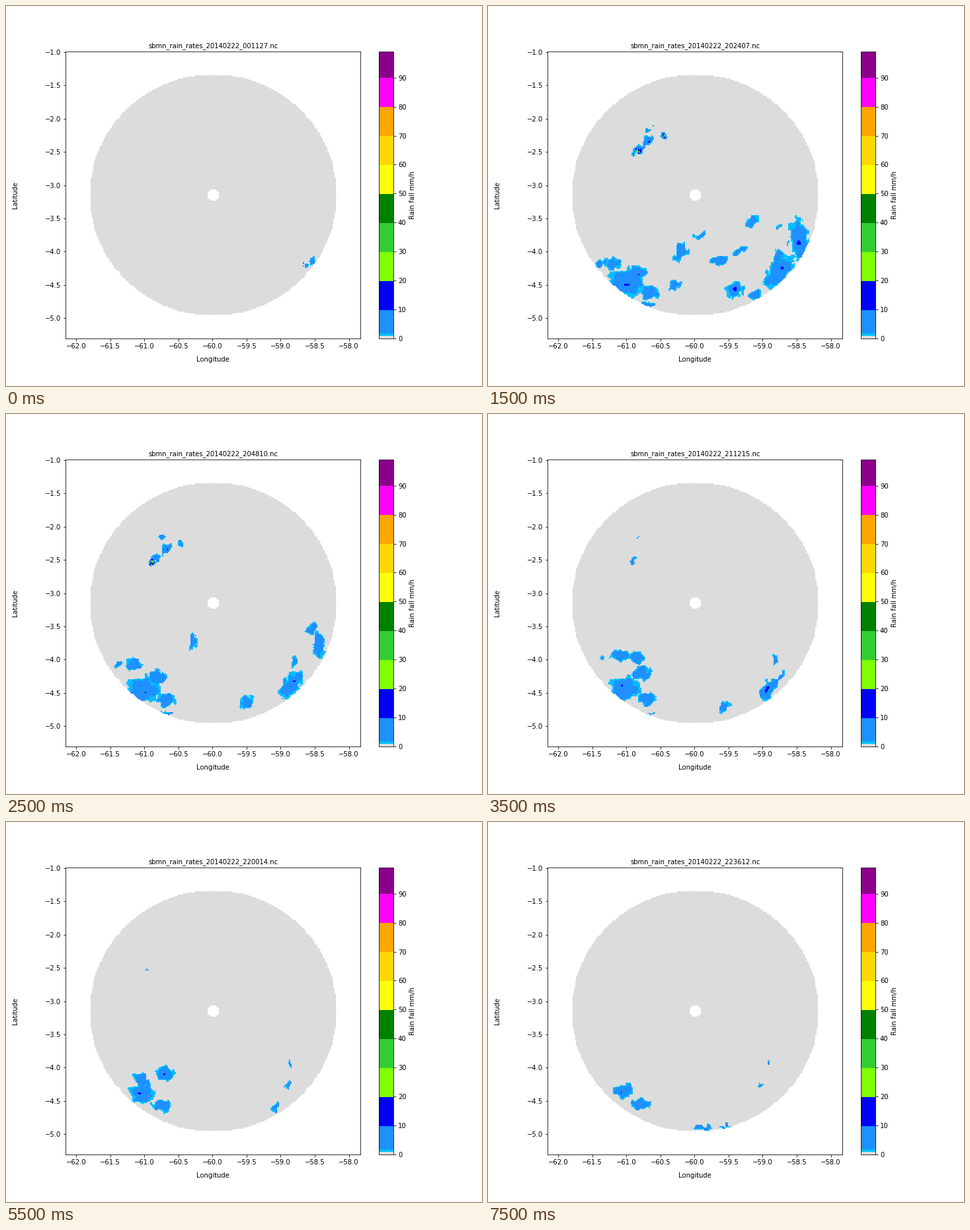
A matplotlib script for the animation above (8 s loop, 720 by 576 pixels).

```python
import numpy as np
import matplotlib.pyplot as plt
from matplotlib.animation import FuncAnimation
from matplotlib.colors import BoundaryNorm, ListedColormap
from matplotlib.transforms import Affine2D

W, H, DPI = 720, 576, 72
CX, CY = 313.2, 286.9       # radar position on the stage
DX, DY = 1.861, 1.824       # size of one radar cell
N = 100                     # range of the radar in cells
LON, LAT = -59.992, -3.149
LON_PX, LAT_PX = 103.1, 100.75   # pixels per degree

LEVELS = [0, 1, 2, *range(10, 100, 10), 99]
COLORS = ["gainsboro", "deepskyblue", "dodgerblue", "blue", "chartreuse",
          "limegreen", "green", "yellow", "gold", "orange", "magenta",
          "darkmagenta"]
TIMES = ("001127 200008 201209 202407 203608 204810 210014 211215 "
         "212413 213610 214812 220014 221213 221813 222411 223612").split()

j, i = np.mgrid[-N:N + 1, -N:N + 1]
r2 = i**2 + j**2
outside = (r2 > N**2) | (r2 < 25)


def ragged(seed):
    """Smooth random offsets that give storms uneven edges."""
    rng = np.random.default_rng(seed)
    out = rng.uniform(-0.6, 0.6, i.shape)
    for _ in range(10):
        a, k = rng.uniform(0, 2 * np.pi), 2 * np.pi / rng.uniform(8, 26)
        out += 0.75 * np.sin(k * (i * DX * np.cos(a) + j * DY * np.sin(a))
                             + rng.uniform(0, 6.28))
    return out


GX = CX + i * DX + ragged(3)
GY = CY + j * DY + ragged(8)
TEXTURE = 0.12 * ragged(5)


def storm(span, start, end, size, ratio=0.5, tilt=0, peak=None):
    """An elliptic storm that drifts and changes size over its life."""
    born, dies = span

    def log_rate(n):
        if not born <= n <= dies:
            return None
        u = (n - born) / max(1, dies - born)
        x, y = (a + (b - a) * u for a, b in zip(start, end))
        r = size[0] + (size[1] - size[0]) * u
        top = peak or min(8, 2.5 + 0.35 * r)
        c, s = np.cos(np.radians(tilt)), np.sin(np.radians(tilt))
        dx, dy = GX - x, GY - y
        d2 = ((dx * c - dy * s) / r)**2 + ((dx * s + dy * c) / (r * ratio))**2
        return np.log(top) * (1 - d2)

    return log_rate


def showers(span, spots, seed):
    rng = np.random.default_rng(seed)
    return [storm(span, p, (p[0] - 4, p[1] - 2), (rng.uniform(9, 15),) * 2,
                  0.5, rng.uniform(10, 50)) for p in spots]


first = [storm((0, 0), (465, 389), (465, 389), (7, 7), 0.75, 50),
         storm((0, 0), (452.5, 392.5), (452.5, 392.5), (5, 5), 0.5, 60)]

north = [storm((1, 11), (231, 216), (215, 226), (13, 3), 0.6, 40),
         storm((1, 6), (231, 214), (220, 229), (5, 5), 0.9, 0, 40),
         storm((1, 5), (268, 195), (264, 196), (9, 6), 0.65, 55),
         storm((1, 4), (266, 196), (266, 198), (4, 4), 1, 0, 25),
         storm((1, 6), (239, 207), (243, 205), (14, 13), 0.42, 52),
         storm((1, 9), (252, 186), (219, 190), (6, 3), 0.5, 20)]

west = [storm((1, 15), (208, 423), (205, 408), (30, 15), 0.75),
        storm((1, 15), (247, 436), (231, 428), (16, 14), 0.65),
        storm((1, 12), (222, 410), (242, 379), (14, 15), 0.75),
        storm((1, 10), (182, 404), (209, 348), (14, 14), 0.65),
        storm((6, 10), (226, 371), (221, 366), (15, 12), 0.6, -20),
        storm((10, 13), (206, 392), (206, 394), (17, 10), 0.65, -50),
        storm((1, 7), (168, 402), (172, 370), (9, 4), 0.75),
        storm((1, 7), (243, 452), (245, 455), (11, 6), 0.45, -20)]

east = [storm((1, 5), (468, 360), (473, 350), (46, 22), 0.42, 94),
        storm((3, 5), (441, 332), (461, 326), (6, 10), 0.55, 45),
        storm((1, 11), (447, 396), (408, 432), (36, 9), 0.5, 55),
        storm((1, 15), (440, 382), (425, 363), (13, 3), 0.5, 75),
        storm((6, 15), (446, 398), (412, 399), (10, 5), 0.45, 50)]

south = [storm((1, 9), (381, 424), (348, 451), (18, 6), 0.75, 40),
         storm((1, 5), (298, 400), (284, 346), (20, 12), 0.55, 68),
         storm((13, 15), (330, 465), (325, 464), (9, 14), 0.28),
         storm((13, 15), (362, 462), (358, 463), (7, 9), 0.25, 10)]

brief = showers((1, 3), [(384, 373), (352, 388), (403, 330), (325, 351),
                         (286, 426), (409, 440)], 2)

storms = first + north + west + east + south + brief


def rain(n):
    fields = [f for f in (s(n) for s in storms) if f is not None]
    log_rate = np.maximum.reduce(fields)
    rate = np.exp(np.clip(log_rate + TEXTURE, -3, 4.2))
    return np.ma.array(rate, mask=outside)


# gaps in the scan: scattered points and straight spokes
rng = np.random.default_rng(11)
angle = rng.uniform(0, 2 * np.pi, 46)
reach = rng.uniform(125, 172, 46)
SCATTER = np.c_[CX + reach * np.cos(angle), CY + reach * np.sin(angle)]
k = np.arange(6)
NORTH_SPOKE = np.c_[284 + 1.8 * k, 113 + 10.8 * k]
EAST_SPOKE = np.c_[436 + 11 * k, 266 - 1.7 * k]
SOUTH_SPOKE = np.c_[333 + 1.8 * k, 405 + 11 * k]


def gaps(n):
    pick = np.random.default_rng(40 + n).random(len(SCATTER)) < 0.5
    pts = [SCATTER[pick]]
    if n in (0, 5, 9, 10, 11):
        pts.append(NORTH_SPOKE)
    if n < 12:
        pts.append(EAST_SPOKE)
    if n == 0:
        pts.append(SOUTH_SPOKE)
    x, y = np.vstack(pts).T
    return LON + (x - CX) / LON_PX, LAT - (y - CY) / LAT_PX


plt.rcParams["font.family"] = "DejaVu Sans"
plt.rcParams["font.size"] = 10
plt.rcParams["text.kerning_factor"] = 6
fig = plt.figure(figsize=(W / DPI, H / DPI), dpi=DPI, facecolor="white")
ax = fig.add_axes([0.125, 0.125, 0.62, 0.755])
cax = fig.add_axes([0.78375, 0.125, 0.0302, 0.755])

hx, hy = (N + 0.5) * DX / LON_PX, (N + 0.5) * DY / LAT_PX
im = ax.imshow(rain(0), cmap=ListedColormap(COLORS),
               norm=BoundaryNorm(LEVELS, len(COLORS)),
               extent=[LON - hx, LON + hx, LAT - hy, LAT + hy],
               aspect="auto", interpolation="nearest")
specks, = ax.plot([], [], ",", color="white")
ax.set_xlim(LON - 2.165, LON + 2.165)
ax.set_ylim(LAT - 2.158, LAT + 2.158)
ax.set_xticks(np.arange(-62, -57.9, 0.5))
ax.set_yticks(np.arange(-5, -0.9, 0.5))
ax.set_xlabel("Longitude", labelpad=10)
ax.set_ylabel("Latitude", labelpad=40)
title = ax.set_title("", fontsize=10)

bar = fig.colorbar(im, cax=cax, spacing="proportional",
                   ticks=range(0, 100, 10))
bar.minorticks_off()
bar.set_label("Rain fall mm/h")
# half a pixel down, so that the colour steps meet the tick marks
bar.solids.set_transform(bar.solids.get_transform()
                         + Affine2D().translate(0, -0.45))


def draw(n):
    im.set_data(rain(n))
    specks.set_data(*gaps(n))
    title.set_text(f"sbmn_rain_rates_20140222_{TIMES[n]}.nc")
    return im, specks, title


anim = FuncAnimation(fig, draw, frames=len(TIMES), interval=500, repeat=True,
                     repeat_delay=0, blit=False)
plt.show()
```
